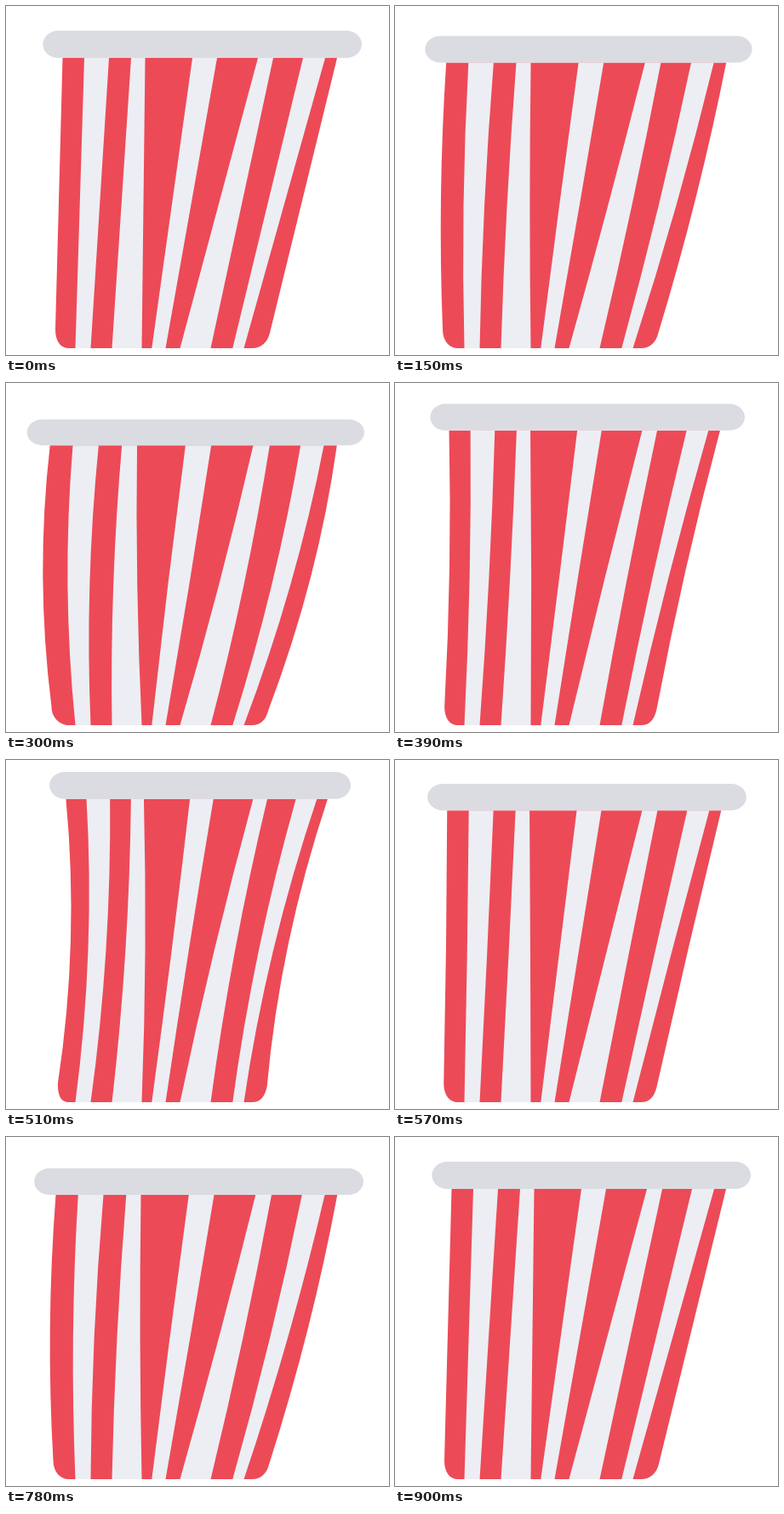
These frames come from a looping animation (450x410 px, 1.35 s). An HTML page:

```html
<!DOCTYPE html>
<html lang="en">
<head>
<meta charset="utf-8">
<title>Striped bucket</title>
<style>
  html, body { margin: 0; height: 100%; overflow: hidden; background: #fff; }
  svg { display: block; width: 100vw; height: 100vh; }
</style>
</head>
<body>
<svg viewBox="0 0 450 410">
  <path id="body" fill="#ed4a57"/>
  <path id="stripes" fill="#eceef4"/>
  <rect id="rim" rx="18" fill="#dbdce2"/>
</svg>
<script>
const STEP = 30, FRAMES = 45, BASE = 402;

// Edges from left to right: the resting place under the rim, and the fixed
// place on the base (the two outer sides end at the feet instead).
const tops = [66.5, 92, 121, 147, 163.5, 219, 248, 296, 314, 349, 375, 389];
const ends = [0, 81.5, 99.5, 124.5, 159.5, 171.3, 187.5, 204.5, 240.5, 266.3, 279.5, 0];
const LAST = tops.length - 1;

// rim: left, top, right, bottom; feet: where the outer sides meet the corners;
// shift: how far the first and last edge slide under the rim;
// bow: outward bulge of the sides, fading to none in the middle.
const rest = { rim: [43.3, 29, 418, 61], feet: [58, 310], shift: [0, 0], bow: [0] };
const squash = { rim: [23, 44.6, 422, 75], feet: [53, 308.5], shift: [-16, 0.5], bow: [10.5] };
const stretch = { rim: [53.3, 11.5, 403.7, 43.3], feet: [61.5, 306.5], shift: [5.5, -12], bow: [-12] };
const keys = [[2, rest], [9, squash], [16, stretch], [22, squash], [30, rest]];

const $ = id => document.getElementById(id);
const ease = t => t * t * (3 - 2 * t);
const lerp = (a, b, t) => a + (b - a) * t;

function poseAt(frame) {
  const i = keys.findIndex(k => frame < k[0]);
  if (i < 1) return rest;
  const [from, a] = keys[i - 1], [to, b] = keys[i];
  const t = ease((frame - from) / (to - from));
  const pose = {};
  for (const k in a) pose[k] = a[k].map((v, j) => lerp(v, b[k][j], t));
  return pose;
}

function draw(frame) {
  const { rim: [left, y, right, lip], feet: [l, r], shift, bow } = poseAt(frame);

  // One curved edge: its upper point, control point and lower point.
  const edge = (i, x = ends[i], h = BASE) => {
    const u = i / LAST, top = tops[i] + lerp(...shift, u);
    const mid = (top + x) / 2 + 2 * bow[0] * (2 * u - 1);
    return { top: `${top} ${lip}`, ctrl: `${mid} ${(lip + h) / 2}`, end: `${x} ${h}` };
  };
  const outline = (a, b, bottom) =>
    `M${a.top}Q${a.ctrl} ${a.end}${bottom}L${b.end}Q${b.ctrl} ${b.top}Z`;

  $("body").setAttribute("d", outline(edge(0, l, 380), edge(LAST, r, 384),
    `C${l} 394 64 ${BASE} 74 ${BASE}H289C299 ${BASE} ${r - 3} 396 ${r} 384`));

  let d = "";
  for (let i = 1; i < LAST; i += 2) d += outline(edge(i), edge(i + 1), "");
  $("stripes").setAttribute("d", d);

  const box = { x: left, y, width: right - left, height: lip - y };
  for (const k in box) $("rim").setAttribute(k, box[k]);
}

const start = performance.now();
function tick() {
  draw(Math.floor((performance.now() - start) / STEP) % FRAMES);
  requestAnimationFrame(tick);
}
tick();
</script>
</body>
</html>
```
